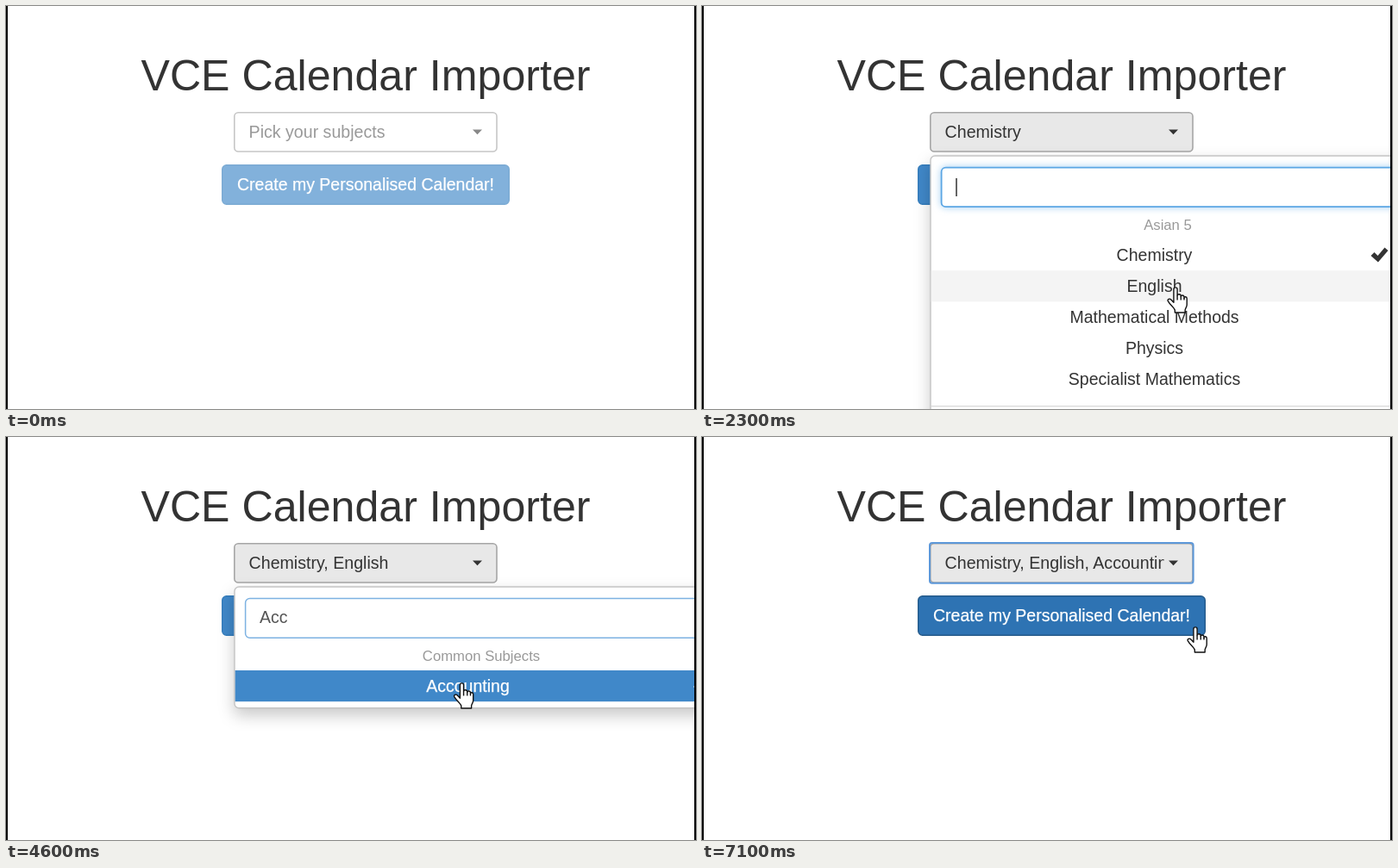
An HTML page that plays this animation: 800 px wide and 468 px high, repeating every 7.2 s.

```html
<!DOCTYPE html>
<html lang="en">
<head>
<meta charset="utf-8">
<title>VCE Calendar Importer</title>
<style>
html, body { margin: 0; width: 100%; height: 100%; overflow: hidden; background: #fff; }
svg { display: block; width: 800px; height: 468px; }
text { font: 19.5px "Liberation Sans", Arial, sans-serif; fill: #333; white-space: pre; }
.mid { text-anchor: middle; }
.head { font-size: 16.7px; fill: #999; }
.title { font-size: 50.15px; }
.light { fill: #fff; stroke: #fff; stroke-width: .25; }
.panel { fill: #fff; stroke: #c4c4c4; stroke-width: 1.4; filter: drop-shadow(0 8px 9px rgba(0,0,0,.21)); }
.field { fill: #fff; stroke: #c4c4c4; stroke-width: 1.5; }
.field.used { stroke: #7db2e2; }
.field.focus { stroke: #5ba6e4; stroke-width: 1.8; filter: drop-shadow(0 0 4px rgba(102,175,233,.6)); }
.pick { fill: #fff; stroke: #c6c6c6; stroke-width: 1.6; }
.pick.on { fill: #e8e8e8; stroke: #a6a6a6; }
.label { font-size: 19.6px; }
.arrow-down { fill: #333; }
.empty .label { fill: #999; }
.empty .arrow-down { fill: #888; }
.empty .create { opacity: .65; }
.go { fill: #4088c9; stroke: #357ebd; stroke-width: 1.4; }
.go.hover { fill: #2e73b3; stroke: #255a8a; }
.row { fill: none; }
.row.over { fill: #f4f4f4; }
.row.active { fill: #4088c9; }
#ring { fill: none; stroke: #5c97d8; stroke-width: 2; }
#pointer path { fill: #fff; stroke: #111; stroke-linejoin: round; }
#pointer .line { fill: none; }
</style>
</head>
<body>
<svg id="stage" viewBox="0 0 800 468">
  <defs>
    <clipPath id="label-clip"><rect x="280" y="124" width="255.6" height="44"/></clipPath>
    <path id="tick" d="M775.5 290l4-4 4 4 8-9.5 4 3.6-11.6 13.4z"/>
  </defs>
  <text class="mid title" x="417" y="98.4">VCE Calendar Importer</text>

  <rect id="pick" class="pick" x="264.8" y="123.8" width="304.2" height="45.2" rx="4.5"/>
  <rect id="ring" x="264" y="122.9" width="305.6" height="46.8" rx="3"/>
  <g clip-path="url(#label-clip)"><text id="label" class="label" x="281.6" y="152.5"></text></g>
  <path class="arrow-down" d="M541 143.5h11l-5.5 5.8z"/>

  <g class="create">
    <rect id="go" class="go" x="250.7" y="184.7" width="332.6" height="45.6" rx="5"/>
    <text class="mid light" x="417" y="213.6">Create my Personalised Calendar!</text>
  </g>

  <g id="menu">
    <rect id="panel" class="panel" x="265" y="174" width="570" height="330" rx="5"/>
    <rect id="field" class="field" x="277.6" y="187.6" width="560" height="45.6" rx="5"/>
    <text id="query" x="294" y="216.3" style="fill:#555"></text>
    <path id="caret" d="M295 200v21" stroke="#222" stroke-width="1.4"/>
    <g id="list"></g>
  </g>

  <g id="pointer">
    <path id="arrow" d="M.5.5V16.5L4.3 13 6.8 18.6 9.2 17.5 6.8 12.1H12z"/>
    <g id="hand" transform="translate(-7 -.6)">
      <path d="M5.5 13V2a1.5 1.5 0 0 1 3 0v5.5c0-2 3-1.7 3 .2v.6c0-1.8 2.7-1.5 2.7.3v.8c0-1.6 2.3-1.3 2.3.4V15c0 2-1.5 3-1.5 4.5v2H6.5v-2C6 17.5 2.5 15 .8 12c-.8-1.6 1.2-2.7 2.5-1.3z"/>
      <path class="line" d="M8.5 7.5V11M11.5 8v3M14.2 9v2"/>
    </g>
    <path id="beam" class="line" d="M-3-7.5h2.3l.7.7.7-.7H3M0-6.8V6.8M-3 7.5h2.3l.7-.7.7.7H3"/>
  </g>

  <path d="M0 0h2v468H0zM798 0h2v468h-2z"/>
</svg>
<script>
const $ = id => document.getElementById(id);
const STEP = 100, LOOP = 7200, ROW = 36.2, TOP = 271;

// Times of the user's actions, in steps.
const at = { enter: 1, press: 13, open: 14, focus: 15, still: 38, blur: 46, press2: 57, close: 58 };
const picks = [[19, "Chemistry"], [25, "English"], [47, "Accounting"]];
const keys = [[29, "A"], [32, "c"], [33, "c"]];
const subjects = ["Chemistry", "English", "Mathematical Methods", "Physics", "Specialist Mathematics"];

// Pointer moves: first step, last step, where it arrives.
const start = { x: 763, y: 402 };
const moves = [
  [1, 8, 575, 140], [8, 11, 532, 156], [14, 19, 541, 288], [20, 23, 549, 327],
  [25, 27, 540, 331], [38, 44, 528.5, 286], [48, 56, 477, 129], [58, 65, 572, 221]
];

const clamp = u => Math.min(1, Math.max(0, u));
const ease = u => u * u * (3 - 2 * u);
const within = (n, a, b) => n >= a && n < b;
const inBox = (p, x, y, r, b) => within(p.x, x, r) && within(p.y, y, b);
const show = (id, on) => $(id).style.display = on ? "" : "none";
const happened = (events, n) => events.filter(e => e[0] <= n).map(e => e[1]);

const pointerAt = n => moves.reduce((p, [a, b, x, y]) => {
  const u = ease(clamp((n - a) / (b - a)));
  return { x: p.x + (x - p.x) * u, y: p.y + (y - p.y) * u };
}, start);

function caretOn(n) {
  const resets = [at.focus, ...[...picks, ...keys].map(e => e[0])];
  const last = Math.max(...resets.filter(r => r <= n));
  return (n - last) % 10 < 5;
}

const head = (x, y, s) => `<text class="mid head" x="${x}" y="${y + .4}">${s}</text>`;
const divider = y => `<path d="M266 ${y}H800" stroke="#ddd" stroke-width="1.4"/>`;

function row(y, s, { x = 524.5, state = "", ticked = false, shift = 0 } = {}) {
  const light = state === "active";
  const mark = `<use href="#tick" x="${shift}" y="${y - TOP}" fill="${light ? "#fff" : "#333"}"/>`;
  return `<rect class="row ${state}" x="265.7" y="${y}" width="540" height="${ROW}"/>` +
    `<text class="mid ${light ? "light" : ""}" x="${x}" y="${y + 24.5}">${s}</text>` +
    (ticked ? mark : "");
}

const fullList = (p, chosen) => head(540, 260, "Asian 5") + subjects.map((s, i) => {
  const y = TOP + i * ROW;
  const state = inBox(p, 266, y, 798, y + ROW) ? "over" : "";
  return row(y, s, { state, ticked: chosen.includes(s) });
}).join("") + divider(464.7);

const broadList = () => head(540, 260, "Asian 5") +
  row(TOP, subjects[2], { state: "active" }) + row(TOP + ROW, subjects[4]) + divider(356) +
  head(540, 388, "Common Subjects") + row(399, "Accounting") + row(399 + ROW, "Algorithmics");

const narrowList = ticked => head(551, 260, "Common Subjects") +
  row(TOP, "Accounting", { x: 535.5, state: "active", ticked, shift: 21.5 });

function drawMenu(n, p, chosen, narrow) {
  const focused = n >= at.focus && n !== at.blur;
  const filter = happened(keys, n - 1).length;
  $("panel").setAttribute("height", narrow ? 140.7 : 330);
  $("field").classList.toggle("used", n >= at.focus);
  $("field").classList.toggle("focus", focused);
  $("query").textContent = happened(keys, n).join("");
  $("caret").setAttribute("transform", `translate(${$("query").getComputedTextLength()})`);
  show("caret", focused && n < at.press2 && caretOn(n));
  $("list").innerHTML = narrow ? narrowList(n >= at.blur)
    : filter ? broadList() : fullList(p, chosen);
}

function draw(n) {
  const p = pointerAt(n), chosen = happened(picks, n);
  const open = within(n, at.open, at.close);
  const narrow = happened(keys, n - 1).length > 1;
  const overPick = inBox(p, 264, 123, 570, 170);
  const overGo = !open && inBox(p, 250, 184, 584, 231);
  const overField = open && inBox(p, 277, 187, 798, 234);
  const overRow = open && inBox(p, 266, TOP, 798, narrow ? TOP + ROW : 452);
  const hand = overPick || overRow || overGo;

  $("stage").classList.toggle("empty", !chosen.length);
  $("label").textContent = chosen.join(", ") || "Pick your subjects";
  $("pick").classList.toggle("on", n >= at.press || overPick);
  $("go").classList.toggle("hover", overGo);
  show("ring", within(n, at.press, at.focus) || n >= at.press2);

  show("menu", open);
  if (open) drawMenu(n, p, chosen, narrow);

  show("pointer", n >= at.enter && !within(n, keys[0][0], at.still));
  show("hand", hand);
  show("beam", overField);
  show("arrow", !hand && !overField);
  $("pointer").setAttribute("transform", `translate(${p.x} ${p.y}) scale(1.39)`);
}

let last = -1;
function tick() {
  const n = Math.floor(performance.now() % LOOP / STEP);
  if (n !== last) draw(last = n);
  requestAnimationFrame(tick);
}
tick();
</script>
</body>
</html>
```
